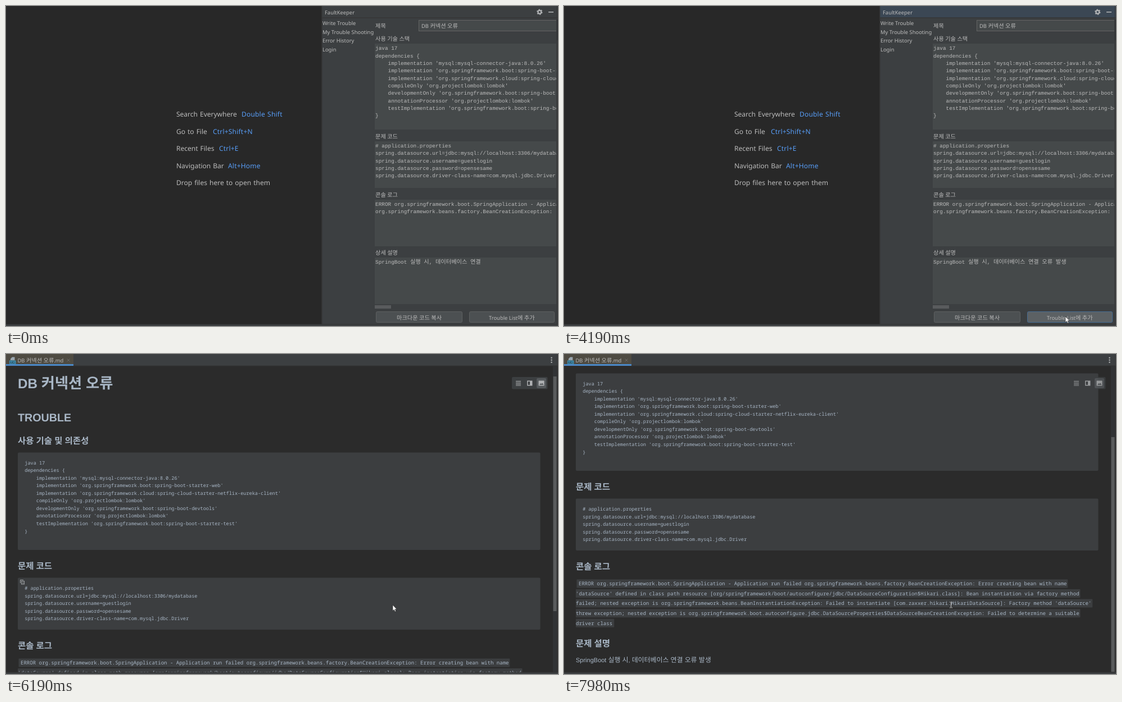
Recreate the animation shown at these times as an HTML page. Size 982 by 570 pixels, loop 8 s.

```html
<!DOCTYPE html>
<html lang="ko">
<head>
<meta charset="utf-8">
<title>Error report to markdown</title>
<style>
html, body { margin: 0; width: 100%; height: 100%; overflow: hidden; background: #3c3f41; }
svg { display: block; width: 982px; height: 570px; }
text { white-space: pre; text-rendering: geometricPrecision; fill: #bbb; }
.ui { font: 9.4px "Noto Sans", sans-serif; }
.hint { font: 12px "Noto Sans", sans-serif; word-spacing: .9px; }
.key { fill: #589df6; letter-spacing: .2px; }
.mono { font: 9.4px "Liberation Mono", monospace; }
.md { fill: #a9b7c6; font: 11px "Liberation Sans", sans-serif; }
.h1 { font-size: 24.2px; font-weight: bold; }
.h2 { font-size: 19.7px; font-weight: bold; }
.h3 { font-size: 14.3px; font-weight: bold; }
.pre { font: 8.54px "Noto Sans Mono", monospace; }
.code { font: 9.06px "Noto Sans Mono", monospace; }
.ko { font-family: "Noto Sans CJK KR", sans-serif; font-size: 1.087em; }
</style>
</head>
<body>
<svg id="stage" viewBox="0 0 982 570"></svg>
<script>
const LOOP = 8000;
const STACK = `java 17
dependencies {
    implementation 'mysql:mysql-connector-java:8.0.26'
    implementation 'org.springframework.boot:spring-boot-starter-web'
    implementation 'org.springframework.cloud:spring-cloud-starter-netflix-eureka-client'
    compileOnly 'org.projectlombok:lombok'
    developmentOnly 'org.springframework.boot:spring-boot-devtools'
    annotationProcessor 'org.projectlombok:lombok'
    testImplementation 'org.springframework.boot:spring-boot-starter-test'
}`;
const PROPS = `# application.properties
spring.datasource.url=jdbc:mysql://localhost:3306/mydatabase
spring.datasource.username=guestlogin
spring.datasource.password=opensesame
spring.datasource.driver-class-name=com.mysql.jdbc.Driver`;
const LOG = `ERROR org.springframework.boot.SpringApplication - Application run failed org.springframework.beans.factory.BeanCreationException: Error creating bean with name
'dataSource' defined in class path resource [org/springframework/boot/autoconfigure/jdbc/DataSourceConfiguration$Hikari.class]: Bean instantiation via factory method
failed; nested exception is org.springframework.beans.BeanInstantiationException: Failed to instantiate [com.zaxxer.hikari.HikariDataSource]: Factory method 'dataSource'
threw exception; nested exception is org.springframework.boot.autoconfigure.jdbc.DataSourceProperties$DataSourceBeanCreationException: Failed to determine a suitable
driver class`;
const PANEL_LOG = `ERROR org.springframework.boot.SpringApplication - Application run failed
org.springframework.beans.factory.BeanCreationException:`;
const TITLE = 'DB 커넥션 오류';
const INTRO = 'SpringBoot 실행 시, 데이터베이스 연결 ';

// Hangul runs get their own face, scaled to a full-em advance
const ko = s => s.replace(/[ㄱ-ㅣ가-힣]+/g, '<tspan class="ko">$&</tspan>');
const text = (x, y, s, cls = 'ui', extra = '') => `<text x="${x}" y="${y}" class="${cls}" ${extra}>${ko(s)}</text>`;
const lines = (x, y, pitch, s, cls) => s.split('\n').map((l, i) => text(x, y + i * pitch, l, cls)).join('');
const box = (x, y, w, h, fill, extra = '') => `<rect x="${x}" y="${y}" width="${w}" height="${h}" fill="${fill}" ${extra}/>`;
const line = (d, color, extra = '') => `<path d="${d}" stroke="${color}" fill="none" ${extra}/>`;

function hints() {
  const rows = [['Search Everywhere', 'Double Shift', 419], ['Go to File', 'Ctrl+Shift+N', 368],
    ['Recent Files', 'Ctrl+E', 379], ['Navigation Bar', 'Alt+Home', 395], ['Drop files here to open them', '', 0]];
  return rows.map(([label, key, x], i) =>
    text(303, 197 + i * 30.6, label, 'hint') + text(x, 197 + i * 30.6, key, 'hint key')).join('');
}

function panel() {
  const areas = [[67, 153, '사용 기술 스택'], [241, 83, '문제 코드'], [345, 83, '콘솔 로그'], [448, 83, '상세 설명']];
  const button = (x, w, tx, label, id) =>
    box(x + .5, 544.5, w, 19, '#4c5052', `id="${id}" stroke="#5e6060" rx="2"`) + text(tx, 558.5, label);
  return box(0, 0, 562, 567, '#282828') + hints()
    + box(561, 0, 1.5, 567, '#323232') + box(562.5, 0, 419.5, 20.5, '#3c3f41', 'id="header"')
    + box(562.5, 20.5, 419.5, 1, '#323232') + text(567, 15, 'FaultKeeper')
    + `<g fill="none" stroke="#afb1b3"><circle cx="949.3" cy="10.7" r="2.9" stroke-width="2.2"/>
       <circle cx="949.3" cy="10.7" r="4.4" stroke-width="1.6" stroke-dasharray="2.3"/></g>`
    + box(965, 10, 9, 1.6, '#afb1b3')
    + ['Write Trouble', 'My Trouble Shooting', 'Error History', 'Login'].map((s, i) => text(563, 34 + i * 15.7, s)).join('')
    + text(657, 38.5, '제목') + box(734.5, 25.5, 250, 19, '#45494a', 'stroke="#646464"') + text(739, 38.5, TITLE)
    + areas.map(([y, h, label]) => text(657, y - 5.5, label) + box(656, y, 323, h, '#45494a')).join('')
    + '<g clip-path="url(#panelClip)">'
    + lines(657, 78.3, 13.35, STACK, 'mono') + lines(657, 252, 13.3, PROPS, 'mono')
    + lines(657, 356, 13.4, PANEL_LOG, 'mono') + text(657, 459, '', 'mono', 'id="typed"') + '</g>'
    + line('M0 461.5h9', '#bbb', 'id="composing" stroke-dasharray="1"')
    + box(0, 449, 1, 13, '#bbb', 'id="caret"')
    + box(656, 533, 29, 6, '#595b5d')
    + button(658, 153, 695, '마크다운 코드 복사', 'copyButton')
    + button(824, 151, 859, 'Trouble List에 추가', 'addButton')
    + box(979, 21.5, 3, 545.5, '#3c3f41') + box(980, 0, 1, 567, '#323232') + box(979.5, 24, 2.5, 37, '#303234');
}

function page() {
  const block = (y, h) => box(21, y, 929.5, h, '#3c3e40', 'rx="2"');
  const [first, ...rest] = LOG.split('\n');
  const shade = [first, ...rest].map((l, i) => {
    const left = i ? 21 : 22.5, textLeft = i ? 21 : 26;
    const end = textLeft + l.length * 5.436 + (i == rest.length ? 3 : .5);
    return box(left, 542.5 + i * 17.55, end - left, 15, '#3c3e40', 'rx="1"');
  }).join('');
  return text(21, 61, TITLE, 'md h1') + text(21, 120, 'TROUBLE', 'md h2')
    + text(21, 159.5, '사용 기술 및 의존성', 'md h3') + block(175.5, 173.5) + lines(33.3, 196.7, 13.54, STACK, 'md pre')
    + text(21, 382.5, '문제 코드', 'md h3') + block(398.5, 92.5) + lines(33.3, 420.3, 13.54, PROPS, 'md pre')
    + `<g id="copyIcon" fill="none" stroke="#9da0a2"><path d="M25.5 408V402.5H31"/>
       <rect x="27.5" y="404.5" width="5" height="5.5"/><path d="M29 406.5h2.5m-2.5 2h2.5" stroke-width=".7"/></g>`
    + text(21, 525, '콘솔 로그', 'md h3') + shade
    + text(26, 553.3, first, 'md code') + lines(21, 570.85, 17.55, rest.join('\n'), 'md code')
    + text(21, 662, '문제 설명', 'md h3') + text(21, 689.7, INTRO + '오류 발생', 'md');
}

function toolbar() {
  const icon = '#afb1b3';
  return '<g id="toolbar">' + box(900, 41, 63.5, 21.5, '#3c3f41', 'rx="2"')
    + line('M907 48.5h9m-9 2.5h9m-9 2.5h9m-9 2.5h9', icon, 'stroke-width="1.1"')
    + line('M927.7 48.2h8v7.6h-8z', icon, 'stroke-width="1.4"') + box(932, 48, 4, 8, icon)
    + box(944, 43, 17, 18, '#55595c', 'rx="2"') + box(947.5, 47.5, 10, 9, icon, 'rx=".5"')
    + '<path d="M949 55l2-3 1.5 1.5 1.5-2 2.5 3.5z" fill="#55595c"/></g>';
}

function editor() {
  return box(0, 0, 982, 570, '#3c3f41') + box(0, 20.5, 982, 1, '#323232')
    + '<g id="preview">' + box(0, 21.5, 982, 546, '#2b2b2b')
    + `<g clip-path="url(#pageClip)"><g id="content">${page()}</g></g>`
    + box(973, 22, 7, 545, '#313335') + box(973.5, 40, 6, 418, '#595b5c', 'id="thumb"')
    + toolbar()
    + [6.8, 10.8, 14.8].map(y => `<circle cx="970.5" cy="${y}" r="1.25" fill="#afb1b3"/>`).join('') + '</g>'
    + box(0, 0, 120, 18.5, '#4e4b42') + box(0, 18, 120, 3, '#4a88c7')
    + '<path d="M8 11V8.5L11 5.5H15.5V11z" fill="#9aa7b0"/>' + box(6, 11.5, 11.5, 6.3, '#3f8fb0')
    + text(7, 16.8, 'MD', 'ui', 'style="font-size:5.5px;fill:#243039"')
    + text(20.5, 15, TITLE + '.md') + line('M108.5 8.5l5 5m0-5l-5 5', '#6e6e6e', 'stroke-width=".9"')
    + box(980.5, 0, 1, 567, '#323232');
}

const stage = document.getElementById('stage');
stage.innerHTML = `<clipPath id="panelClip"><rect x="656" y="22" width="323" height="520"/></clipPath>
  <clipPath id="pageClip"><rect y="21.5" width="973" height="545.5"/></clipPath>
  ${box(0, 0, 982, 570, '#3c3f41')}<g id="panel">${panel()}</g><g id="editor">${editor()}</g>
  ${box(0, 566.5, 982, 1.2, '#323232')}${box(0, 567.5, 982, 2.5, '#3c3f41')}
  <path id="arrow" d="M0 0V10.5L2.4 8.3 4 12 5.7 11.3 4.2 7.7H7.2z" fill="#fff" stroke="#222" stroke-width=".6"/>
  <path id="beam" d="M-2.5-5H-.6M.6-5H2.5M0-4.5V4.5M-2.5 5H-.6M.6 5H2.5" stroke="#c8c8c8" fill="none"/>`;

const el = {};
stage.querySelectorAll('[id]').forEach(e => el[e.id] = e);
const show = (e, on) => e.setAttribute('visibility', on ? 'inherit' : 'hidden');
const move = (e, x, y) => e.setAttribute('transform', `translate(${x} ${y})`);

// [time, text being typed]; the last syllable is still being composed
const TYPING = [[0, ''], [1720, 'ㅇ'], [1790, '오'], [1990, '올'], [2120, '오류'], [2260, '오류 '], [2360, '오류 ㅂ'],
  [2460, '오류 바'], [2560, '오류 발'], [2660, '오류 밠'], [2800, '오류 발새'], [2930, '오류 발생']];
const SCROLL = [[0, 0], [6390, 12], [6455, 28], [6520, 43], [6650, 59], [6780, 106], [6920, 137], [7320, 141]];
const MOUSE = [[130, 950, 590], [450, 925, 530], [800, 901, 463], [3390, 901, 463], [3600, 868, 535],
  [3720, 847, 557], [3920, 892, 553], [5720, 892, 553], [5950, 780, 498], [6190, 688, 447], [8000, 688, 447]];

const held = (keys, t) => keys.findLast(k => k[0] <= t)[1];
function mouseAt(t) {
  const i = MOUSE.findIndex(k => k[0] > t);
  if (i < 1) return MOUSE[0].slice(1);
  const [t0, x0, y0] = MOUSE[i - 1], [t1, x1, y1] = MOUSE[i], p = (t - t0) / (t1 - t0);
  return [x0 + (x1 - x0) * p, y0 + (y1 - y0) * p];
}
const monoWidth = s => [...s].reduce((w, c) => w + (c >= 'ㄱ' ? 9.4 : 5.64), 0);

let shown;
function drawPanel(t) {
  const typed = held(TYPING, t), open = typed && !typed.endsWith(' ') && t < 4190;
  if (typed !== shown) el.typed.innerHTML = ko(INTRO + (shown = typed));
  const x = 657 + monoWidth(INTRO + (open ? typed.slice(0, -1) : typed));
  el.caret.setAttribute('x', Math.round(x - .6));
  show(el.caret, t >= 820 && t < 1320 || t >= 1720 && t < 3450 || t >= 3920 && t < 4190);
  move(el.composing, x, 0);
  show(el.composing, open);
  el.header.setAttribute('fill', t < 820 ? '#3c3f41' : '#3b4754');
  el.addButton.setAttribute('stroke', t < 4190 ? '#5e6060' : '#466d94');
  el.addButton.setAttribute('fill', t >= 4190 && t < 4320 ? '#5c6164' : '#4c5052');
}

function drawEditor(t, mouseY) {
  const scroll = held(SCROLL, t), loaded = t >= 5060;
  show(el.preview, t >= 4790);
  for (const part of [el.content, el.thumb, el.toolbar]) show(part, loaded);
  move(el.content, 0, -scroll);
  move(el.thumb, 0, scroll * .766);
  show(el.copyIcon, loaded && mouseY < 491 && t < 7920);
  el.toolbar.setAttribute('opacity', t < 7720 ? 1 : t < 7920 ? .92 : .8);
}

function frame() {
  const t = performance.now() % LOOP, inEditor = t >= 4520, [x, y] = mouseAt(t);
  el.panel.style.display = inEditor ? 'none' : '';
  el.editor.style.display = inEditor ? '' : 'none';
  if (inEditor) drawEditor(t, y); else drawPanel(t);
  const beam = inEditor ? t >= 7920 : y < 531;
  show(el.beam, beam);
  show(el.arrow, !beam);
  move(el.beam, Math.round(x) + .5, Math.round(y));
  move(el.arrow, x, y);
  requestAnimationFrame(frame);
}
frame();
</script>
</body>
</html>
```
